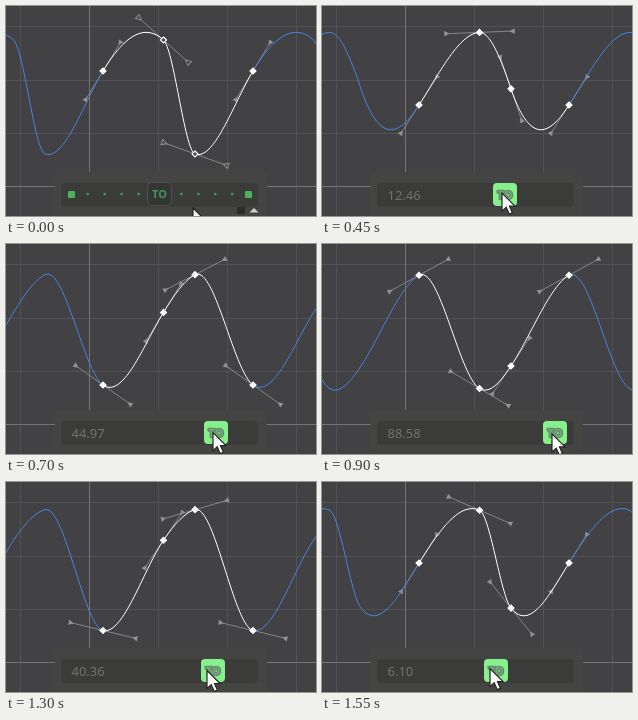
An HTML page with a canvas for the animation above (1600 ms loop, 310 px wide and 210 px high).

```html
<!DOCTYPE html>
<html lang="en">
<head>
<meta charset="utf-8">
<title>Time offset slider</title>
<style>
  html, body { margin: 0; width: 100%; height: 100%; overflow: hidden; background: #424244; }
  canvas { display: block; width: 310px; height: 210px; }
</style>
</head>
<body>
<canvas id="stage" width="310" height="210"></canvas>
<script>
const ctx = document.getElementById('stage').getContext('2d');
const LOOP = 1600, STEP = 50, PRESS = 150, RETURN = 1100;
const PERIOD = 150, HANDLE = 33;
const FONT = '"Noto Sans", "Open Sans", sans-serif';

// Button travel in px over time in ms.
const drag = [[PRESS, 0], [250, 9], [450, 30], [700, 57], [900, 80], [950, 82],
  [RETURN, 80], [1300, 54], [1550, 21]];

const keyX = [97, 157.5, 189, 247];
const baseY = [65, 34, 148, 65];
const baseSlope = [-1.65, 0.9, 0.36, -1.65];

// Tangent slope by position: gentle at the turns, steepest on the fall.
const tangent = [[97, -1.65], [123, -0.64], [140, -0.03], [157.5, 0.9], [171, 3],
  [182, 0.9], [189, 0.36], [217, -1.5], [247, -1.65]];

const lerp = (a, b, t) => a + (b - a) * t;

function lookup(points, x) {
  let i = 1;
  while (i < points.length - 1 && x > points[i][0]) i++;
  const [x0, y0] = points[i - 1], [x1, y1] = points[i];
  return lerp(y0, y1, (x - x0) / (x1 - x0));
}

const wrap = x => keyX[0] + (((x - keyX[0]) % PERIOD) + PERIOD) % PERIOD;

// Cyclic cubic Hermite curve through the keys.
function curveAt(x, ys, slopes) {
  x = wrap(x);
  const i = x < keyX[1] ? 0 : x < keyX[2] ? 1 : 2;
  const h = keyX[i + 1] - keyX[i], t = (x - keyX[i]) / h, u = 1 - t;
  return ys[i] * (1 + 2 * t) * u * u + ys[i + 1] * t * t * (3 - 2 * t)
    + h * t * u * (slopes[i] * u - slopes[i + 1] * t);
}

function path(points, { fill, stroke, width = 1, close = true }) {
  ctx.beginPath();
  points.forEach(([x, y]) => ctx.lineTo(x, y));
  if (close) ctx.closePath();
  if (fill) { ctx.fillStyle = fill; ctx.fill(); }
  if (stroke) { ctx.strokeStyle = stroke; ctx.lineWidth = width; ctx.stroke(); }
}

function box(x, y, w, h, r, fill, stroke) {
  ctx.beginPath();
  ctx.roundRect(x, y, w, h, r);
  ctx.fillStyle = fill;
  ctx.fill();
  if (stroke) { ctx.strokeStyle = stroke; ctx.lineWidth = 1; ctx.stroke(); }
}

function label(text, x, y, font, { fill, outline, align = 'left' }) {
  ctx.font = `${font} ${FONT}`;
  ctx.textAlign = align;
  if (outline) {
    ctx.lineJoin = 'round';
    ctx.strokeStyle = outline;
    ctx.lineWidth = 2.6;
    ctx.strokeText(text, x, y);
    ctx.lineJoin = 'miter';
  }
  ctx.fillStyle = fill;
  ctx.fillText(text, x, y);
}

function drawGrid() {
  ctx.fillStyle = '#424244';
  ctx.fillRect(0, 0, 310, 210);
  ctx.fillStyle = '#525254';
  for (let x = 14; x < 310; x += 69) ctx.fillRect(x, 0, 1, 210);
  for (let y = 20; y < 180; y += 53.5) ctx.fillRect(0, Math.round(y), 310, 1);
  ctx.fillStyle = '#747476';
  ctx.fillRect(83, 0, 1, 210);
  ctx.fillRect(0, 180, 310, 1);
}

function drawCurve(ys, slopes) {
  const span = (from, to, color) => {
    const points = [];
    for (let x = from; x <= to; x++) points.push([x, curveAt(x, ys, slopes)]);
    path(points, { stroke: color, close: false });
  };
  span(-1, 97, '#4a82dc');
  span(247, 311, '#4a82dc');
  span(97, 247, '#ffffff');
}

function drawHandles(x, y, slope, hollow) {
  const angle = Math.atan(slope);
  const dx = HANDLE * Math.cos(angle), dy = HANDLE * Math.sin(angle);
  path([[x - dx, y - dy], [x + dx, y + dy]], { stroke: '#858585', close: false });
  for (const side of [-1, 1]) {
    ctx.save();
    ctx.translate(x + side * dx, y + side * dy);
    ctx.rotate(angle);
    path([[-side * 3, 0], [side * 2.3, -2.7], [side * 2.3, 2.7]],
      hollow ? { fill: '#424244', stroke: '#909090' } : { fill: '#929292' });
    ctx.restore();
  }
}

function drawKey(x, y, hollow) {
  const r = hollow ? 3 : 3.8;
  path([[x, y - r], [x + r, y], [x, y + r], [x - r, y]],
    hollow ? { fill: '#424244', stroke: '#fff', width: 1.2 } : { fill: '#fff' });
}

function drawIdleSlider() {
  for (const side of [-1, 1]) {
    const at = distance => 154 + side * distance;
    for (let i = 0; i < 4; i++) {
      ctx.beginPath();
      ctx.arc(at(21.5 + i * 16.9), 188, 1.3, 0, 7);
      ctx.fillStyle = '#43a058';
      ctx.fill();
    }
    box(at(88.5) - 3.5, 185, 7, 7, 1, '#4db05c');
  }
  box(141.5, 176.5, 24, 23, 4, '#343634', '#505250');
  label('TO', 153.5, 192, 'bold 11px', { fill: '#43935a', align: 'center' });
  box(231, 201, 8, 7, 1, '#2b2b2a');
  path([[243.5, 206.5], [248, 202], [252.5, 206.5]], { fill: '#cfcfcf' });
}

function drawActiveSlider(x, value) {
  label(value.toFixed(2), 65.5, 194, '13px', { fill: '#71716f' });
  box(x - 12, 177, 24, 23, 4, '#86f08c');
  label('TO', x, 192.5, 'bold 11px',
    { fill: '#78a87d', outline: '#628a68', align: 'center' });
}

function drawCursor(x, y) {
  path([[0, 0], [0, 18], [4.2, 14.2], [7.3, 21], [10.4, 19.6], [7.5, 13], [13, 13]]
    .map(([dx, dy]) => [x + dx, y + dy]), { fill: '#fff', stroke: '#242424', width: 1.2 });
}

function draw(time) {
  const idle = time < PRESS;
  const travel = idle ? 0 : lookup(drag, time);
  const value = 100 * (travel / 85) ** 2;
  const shift = 1.5 * value ** 0.98;
  const ys = keyX.map(x => curveAt(x - shift, baseY, baseSlope));
  const slopes = keyX.map(x => lookup(tangent, wrap(x - shift)));
  const isHollow = i => idle && (i === 1 || i === 2);

  drawGrid();
  keyX.forEach((x, i) => drawHandles(x, ys[i], slopes[i], isHollow(i)));
  drawCurve(ys, slopes);
  keyX.forEach((x, i) => drawKey(x, ys[i], isHollow(i)));

  box(49, 166, 212, 44, 0, '#444442');
  box(55, 177, 197, 24, 4, '#3b3b39');
  if (idle) {
    const t = time / PRESS;
    drawIdleSlider();
    drawCursor(lerp(187, 157, t), lerp(202, 186, t));
  } else {
    // The button trails the pointer on the way back.
    const lead = time < RETURN ? -3 : -6;
    drawActiveSlider(153 + travel, value);
    drawCursor(153 + travel + lead, 185.5 + travel / 18);
  }
}

function tick() {
  const time = performance.now() % LOOP;
  draw(time - time % STEP);
  requestAnimationFrame(tick);
}
tick();
</script>
</body>
</html>
```
